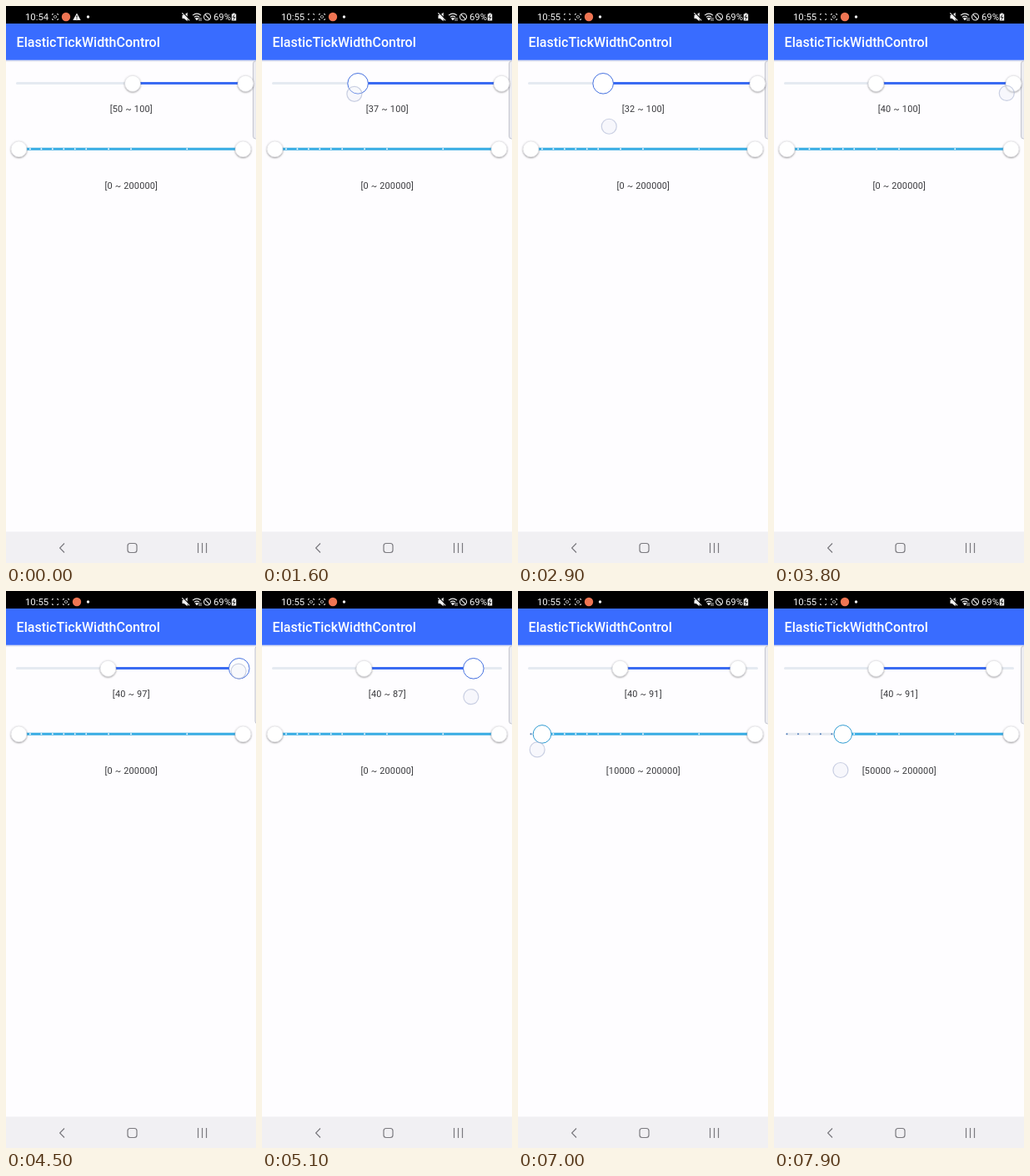
Animation of 300x667 px, one loop 8 s. Source, as an HTML page:

```html
<!DOCTYPE html>
<html lang="en">
<head>
<meta charset="utf-8">
<title>Range sliders</title>
<style>
html, body { margin: 0; width: 100%; height: 100%; overflow: hidden; background: #fefdff; }
svg { display: block; width: 300px; height: 667px; }
text { font-family: Roboto, sans-serif; }
.status { font-size: 11.3px; fill: #f4f4f4; }
.title { font-size: 16px; font-weight: 500; fill: #fff; }
.label { font-size: 10.9px; letter-spacing: .2px; fill: #38383c; text-anchor: middle; }
.line { fill: none; stroke: #eee; stroke-width: 1.1; }
.scan { fill: none; stroke: #d4d4d4; stroke-width: .9; }
.nav { fill: none; stroke: #7b7a7f; stroke-width: 1.2; }
.rail { stroke: #e5eaf1; stroke-width: 3; stroke-linecap: round; }
.fill { stroke-width: 3; }
.thumb { fill: #fff; }
</style>
</head>
<body>
<svg viewBox="0 0 300 667" xmlns="http://www.w3.org/2000/svg">
  <defs>
    <filter id="soft" x="-40%" y="-40%" width="180%" height="190%">
      <feDropShadow dx="0" dy=".8" stdDeviation="1.1" flood-color="#000" flood-opacity=".5"/>
    </filter>
    <linearGradient id="shade" x2="0" y2="1">
      <stop stop-color="#8e9cc8" stop-opacity=".45"/>
      <stop offset="1" stop-color="#8e9cc8" stop-opacity="0"/>
    </linearGradient>
    <path id="corners" class="scan" d="M-3.5-2v-1.5h1.5M2-3.5h1.5v1.5M3.5 2v1.5h-1.5M-2 3.5h-1.5v-1.5"/>
    <rect id="lens" class="scan" x="-1.7" y="-1.3" width="3.4" height="2.6" rx="1"/>
  </defs>
  <rect width="300" height="667" fill="#fefdff"/>
  <rect y="64.5" width="300" height="3" fill="url(#shade)"/>
  <rect y="21" width="300" height="43.7" fill="#396cff"/>
  <rect width="300" height="21"/>
  <text class="title" x="12.6" y="49">ElasticTickWidthControl</text>

  <text class="status" id="clock" x="23" y="17"></text>
  <use href="#corners" x="59" y="13"/>
  <use href="#lens" id="blink" x="59" y="13"/>
  <g id="scan2"><use href="#corners" x="72" y="13"/><use href="#lens" x="72" y="13"/></g>
  <g id="warn"><path d="M85 8.5l4.7 8.5h-9.4z" fill="#f4f4f4"/><path d="M85 11.3v2.8M85 15v1" stroke="#000"/></g>
  <circle id="rec" cy="13" r="5.2" fill="#ef7553"/>
  <circle cx="98.5" cy="13" r="1.7" fill="#f4f4f4"/>

  <path d="M211.5 11h2.2l4-3.2v10.4l-4-3.2h-2.2z" fill="#f4f4f4"/>
  <path d="M212 7.6l9 9" stroke="#000" stroke-width="1.2"/>
  <path class="line" d="M211.3 8.4l8.8 8.9"/>
  <path class="line" d="M224 11.2q5-4.2 10 0M225.9 13.4q3.1-2.6 6.2 0"/>
  <path d="M227.3 14.8q1.7-1.2 3.4 0l-1.7 2.2zM232 14v4M234 14v4" fill="#f4f4f4" stroke="#eee" stroke-width=".8"/>
  <circle class="line" cx="241.5" cy="13" r="4"/>
  <path class="line" d="M238.7 10.2l5.6 5.6"/>
  <text class="status" x="249" y="17">69%</text>
  <path d="M272.4 8.5h2.2v1h1.6v8h-5.4v-8h1.6z" fill="#f4f4f4"/>
  <path d="M274.2 10.5l-2 3h2.6l-2 3" fill="none" stroke="#111" stroke-width=".9"/>

  <rect id="edge" x="296.5" y="66" width="9" height="93" rx="3" fill="#ececf1" stroke="#c4c5cf"/>

  <path class="rail" d="M13.5 92.5H286.5"/>
  <path class="fill" id="fillA" stroke="#3a6bf2"/>
  <path class="rail" d="M15.5 171.3H284.5"/>
  <path class="fill" id="fillB" stroke="#38ade4"/>
  <g id="ticks"></g>
  <circle class="thumb" id="a0" cy="92.8"/>
  <circle class="thumb" id="a1" cy="92.8"/>
  <circle class="thumb" id="b0" cy="171.4"/>
  <circle class="thumb" id="b1" cy="171.4"/>
  <text class="label" id="textA" x="150.3" y="126.5"></text>
  <text class="label" id="textB" x="150.3" y="219"></text>
  <circle id="touch" r="9" fill="#e8ebf6" fill-opacity=".3" stroke="#a9b3d0" stroke-opacity=".6" stroke-width="1.2"/>

  <rect y="629.5" width="300" height="37.5" fill="#f1f0f3"/>
  <path class="nav" d="M70 643.5l-5.4 5.5 5.4 5.5M230.5 643v12M235.5 643v12M240.5 643v12"/>
  <rect class="nav" x="146" y="643.5" width="11" height="11" rx="3"/>
</svg>
<script>
const LOOP = 8000, LAG = 40;
const LEFT = 12, RIGHT = 287.5;
const el = id => document.getElementById(id);
const set = (node, attrs) => { for (const k in attrs) node.setAttribute(k, attrs[k]); };
const clamp = (v, lo, hi) => Math.min(hi, Math.max(lo, v));
const progress = (t, a, b) => clamp((t - a) / (b - a), 0, 1);
const easeIn = u => u * u;
const smooth = u => u * u * (3 - 2 * u);

// One straight finger movement from a to b.
const leg = (t0, t1, a, b, ease) => ({ t0, t1, a, b, ease });

const lowDrag = [
  leg(850, 2250, [152, 95], [9, 131], easeIn),
  leg(2350, 3050, [9, 131], [122.5, 146], smooth)
];
const highDrag = [
  leg(3400, 4300, [278, 112], [281, 94], smooth),
  leg(4300, 5300, [281, 94], [234, 145], easeIn),
  leg(5300, 6250, [234, 145], [264, 145], smooth)
];
const stepDrag = [leg(6700, LOOP, [14, 186], [81, 215], smooth)];

function finger(drag, t) {
  const now = drag.filter(l => l.t0 <= t).pop() || drag[0];
  const u = now.ease(progress(t, now.t0, now.t1));
  return now.a.map((p, i) => p + (now.b[i] - p) * u);
}
const follow = (drag, t) => clamp(finger(drag, t - LAG)[0], LEFT, RIGHT);
const active = (drag, t, delay = 0) =>
  t >= drag[0].t0 + delay && t < drag[drag.length - 1].t1;

const steps = [0, 10, 20, 30, 40, 50, 60, 80, 100, 150, 200];
const stepX = k => 15.5 + k * 1.345;
const percent = x => Math.min(100, Math.floor((x - LEFT) / 2.754));
const nearest = x => steps.reduce((best, k) =>
  Math.abs(stepX(k) - x) < Math.abs(stepX(best) - x) ? k : best);

const ticks = steps.map(k => {
  const dot = document.createElementNS('http://www.w3.org/2000/svg', 'circle');
  set(dot, { cx: stepX(k), cy: 171.3, r: 0.95 });
  el('ticks').append(dot);
  return dot;
});

function thumb(id, x, held, r, color) {
  set(el(id), held
    ? { cx: x, r, stroke: color, 'stroke-width': 1, filter: 'none' }
    : { cx: x, r: 9.4, stroke: '#d6d6dc', 'stroke-width': 0.4, filter: 'url(#soft)' });
}

function statusBar(t) {
  const shift = progress(t, 50, 250);
  el('clock').textContent = t < 200 ? '10:54' : '10:55';
  set(el('blink'), { opacity: t % 1000 < 500 ? 1 : 0 });
  set(el('scan2'), { opacity: shift });
  set(el('warn'), { opacity: 1 - shift });
  set(el('rec'), { cx: 72 + 13 * shift });
}

function percentSlider(t) {
  const low = follow(lowDrag, t);
  const high = t < 4100 ? RIGHT : follow(highDrag, t);
  set(el('fillA'), { d: `M${low} 92.5H${high}` });
  thumb('a0', low, active(lowDrag, t, 100), 12.3, '#4470e0');
  thumb('a1', high, active(highDrag, t, 700), 12.3, '#4470e0');
  el('textA').textContent = `[${percent(low)} ~ ${percent(high)}]`;
}

function stepSlider(t) {
  const step = nearest(finger(stepDrag, t)[0]);
  set(el('fillB'), { d: `M${stepX(step)} 171.3H${stepX(200)}` });
  ticks.forEach((dot, i) => set(dot, { fill: steps[i] < step ? '#4a78b8' : '#fff' }));
  thumb('b0', stepX(step), active(stepDrag, t, 150), 10.8, '#2f9bd2');
  thumb('b1', stepX(200), false);
  el('textB').textContent = `[${step * 1000} ~ 200000]`;
}

function draw(t) {
  statusBar(t);
  percentSlider(t);
  stepSlider(t);

  const drag = [lowDrag, highDrag, stepDrag].find(d => active(d, t));
  const [cx, cy] = finger(drag || lowDrag, t);
  set(el('touch'), { cx, cy, opacity: drag ? 1 : 0 });

  // The edge handle slips aside while the finger is close.
  const away = 2.5 * (progress(t, 4150, 4350) - progress(t, 4850, 5050));
  set(el('edge'), { transform: `translate(${away})` });
}

const start = performance.now();
function frame() {
  draw((performance.now() - start) % LOOP);
  requestAnimationFrame(frame);
}
frame();
</script>
</body>
</html>
```
